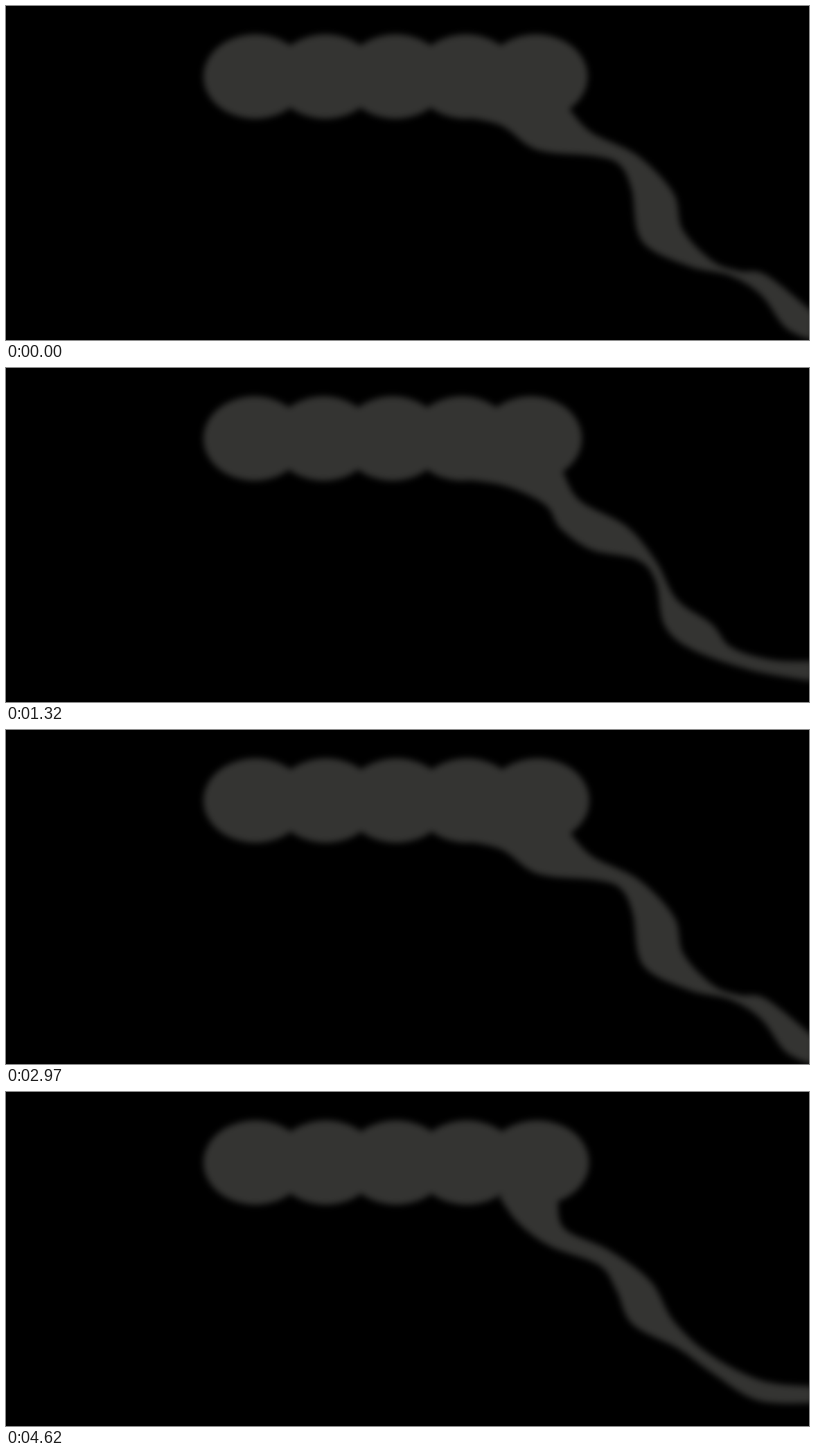
Write an HTML page that moves like this. It is 1159 by 483 pixels and loops after 4950 ms.

```html
<!DOCTYPE html>
<html lang="en">
<head>
<meta charset="utf-8">
<title>Wobbling smoke</title>
<style>
html, body { margin: 0; width: 100%; height: 100%; overflow: hidden; background: #000; }
svg { display: block; width: 100%; height: 100%; }
</style>
</head>
<body>
<svg viewBox="0 0 1159 483" preserveAspectRatio="none">
  <defs>
    <filter id="soft" filterUnits="userSpaceOnUse" x="0" y="0" width="1190" height="520" color-interpolation-filters="sRGB">
      <feGaussianBlur stdDeviation="4.8"/>
    </filter>
  </defs>
  <g id="smoke" fill="#343432" filter="url(#soft)"></g>
</svg>
<script>
const STEP = 330, CYCLES = 5, PUFFS = 5;
const LEFT = 285, MIDDLE = 102, HEIGHT = 61;

// Each pose: distance between puffs and key points of the ribbon's edges.
const poses = [
  {
    pitch: 101.3,
    upper: 'M813,149 845,183 911,216 963,270 977,324 1020,369 1058,383 1097,389 1165,443',
    lower: 'M663,161 715,173 767,208 850,217 885,229 903,265 918,340 985,376 1045,390 1090,418 1125,465 1165,484'
  },
  {
    pitch: 99.6,
    upper: 'M804,152 828,192 895,229 938,280 968,335 1018,370 1047,404 1105,422 1165,424',
    lower: 'M660,161 722,171 778,198 800,232 845,263 910,277 937,308 950,372 990,407 1075,437 1165,453'
  },
  {
    pitch: 101.5,
    upper: 'M796,158 806,198 870,229 930,274 963,331 1015,379 1090,417 1165,426',
    lower: 'M712,152 740,190 785,223 855,250 880,286 904,336 970,371 1020,407 1085,446 1165,450'
  }
];

// The middle of the ribbon follows the sway most.
function edge(keys, sway) {
  return keys.slice(1).split(' ').map(key => {
    const [x, y] = key.split(',').map(Number);
    return [x + sway * Math.max(0, 1 - Math.abs(x - 880) / 210), y];
  });
}

// Catmull-Rom spline as cubic curves.
function spline(points) {
  return points.slice(1).map((q, i) => {
    const p = points[i], before = points[i - 1] || p, after = points[i + 2] || q;
    const a = p.map((v, k) => v + (q[k] - before[k]) / 6);
    const b = q.map((v, k) => v - (after[k] - p[k]) / 6);
    return `C${a} ${b} ${q}`;
  }).join('');
}

function puff(pitch, i) {
  const rx = pitch * 0.737;
  return `<ellipse cx="${LEFT + rx + i * pitch}" cy="${MIDDLE}" rx="${rx}" ry="${HEIGHT}"/>`;
}

function ribbon(pose, sway) {
  const top = edge(pose.upper, sway);
  const bottom = edge(pose.lower, sway).reverse();
  return `<path d="M760,105L${top[0]}${spline(top)}L${bottom[0]}${spline(bottom)}Z"/>`;
}

const smoke = document.getElementById('smoke');
let shown = -1;

function draw(time) {
  const step = Math.floor(time / STEP) % (CYCLES * poses.length);
  if (step === shown) return;
  shown = step;
  const pose = poses[step % poses.length];
  const cycle = Math.floor(step / poses.length);
  const sway = 1 - Math.cos(2 * Math.PI * cycle / CYCLES);
  const pitch = pose.pitch + sway / (PUFFS - 1);
  let shapes = ribbon(pose, sway);
  for (let i = 0; i < PUFFS; i++) shapes += puff(pitch, i);
  smoke.innerHTML = shapes;
}

const start = performance.now();
function tick() {
  draw(performance.now() - start);
  requestAnimationFrame(tick);
}
tick();
</script>
</body>
</html>
```
